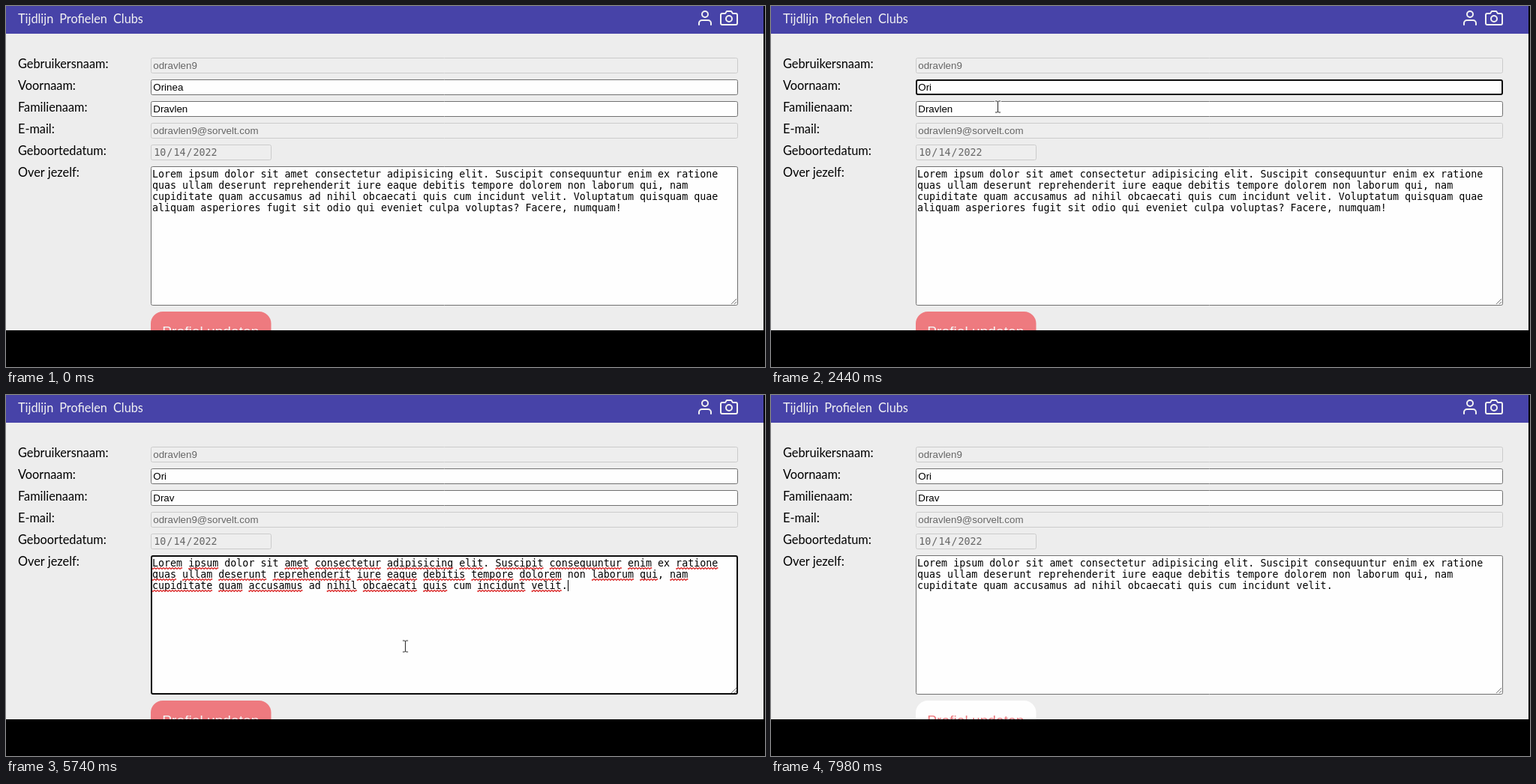
Write an HTML page with a canvas that moves like this. It is 1012 px wide and 482 px high and loops after 8 s.

```html
<!DOCTYPE html>
<html lang="nl">
<head>
<meta charset="utf-8">
<title>Profiel</title>
<style>
html, body { margin: 0; width: 100%; height: 100%; overflow: hidden; background: #000; }
canvas { display: block; }
</style>
</head>
<body>
<canvas id="stage" width="1012" height="482"></canvas>
<script>
const ctx = document.getElementById('stage').getContext('2d');
const LOOP = 8000, PAGE_W = 1010, PAGE_H = 433;
const LEFT = 193, WIDTH = 783, TEXT_X = 195, CHAR = 13.3333 * 0.60205, LINE = 15;
const LATO = '16.3px Lato, sans-serif';
const ARIAL = '13.3333px "Liberation Sans", Arial, sans-serif';
const MONO = '13.3333px "DejaVu Sans Mono", monospace';
const BUTTON_FONT = '19.2px "Liberation Sans", Arial, sans-serif';
const PAGE = '#ededed', PAPER = '#fefefe', INDIGO = '#4743a8', CORAL = '#ee7a7f';
const PALE = '#f2f2f2', MUTED = '#666', MINT = '#a2e9e6';

const BIO = [
  'Lorem ipsum dolor sit amet consectetur adipisicing elit. Suscipit consequuntur enim ex ratione',
  'quas ullam deserunt reprehenderit iure eaque debitis tempore dolorem non laborum qui, nam',
  'cupiditate quam accusamus ad nihil obcaecati quis cum incidunt velit. Voluptatum quisquam quae',
  'aliquam asperiores fugit sit odio qui eveniet culpa voluptas? Facere, numquam!'
];
const KEPT = BIO[2].indexOf(' Voluptatum');
const KNOWN = ['dolor', 'sit', 'ex', 'non', 'ad', 'cum'];
const LABELS = ['Gebruikersnaam:', 'Voornaam:', 'Familienaam:', 'E-mail:', 'Geboortedatum:', 'Over jezelf:'];

const FIRST = { text: 'Orinea', focus: 1450, erase: [1620, 1770, 1920] };
const LAST = { text: 'Dravlen', focus: 2640, erase: [2840, 2970, 3100] };
const BIO_FOCUS = 3500, SPELLING = 4100, DRAG = 4540, CUT = 5430, SUBMIT = 6920;

// Pointer path: time, x, y
const PATH = [
  [70, 400, -20], [900, 330, 116], [990, 327, 121], [1400, 310, 109], [2000, 310, 109],
  [2400, 302, 134], [3100, 302, 134], [3480, 927, 301], [4050, 927, 301], [4500, 820, 270],
  [4560, 820, 270], [4810, 748, 249], [5460, 748, 249], [6060, 270, 440]
];

const iconUser = new Path2D('M20 21v-2a4 4 0 0 0-4-4H8a4 4 0 0 0-4 4v2M16 7a4 4 0 1 1-8 0a4 4 0 1 1 8 0');
const iconCamera = new Path2D('M23 19a2 2 0 0 1-2 2H3a2 2 0 0 1-2-2V8a2 2 0 0 1 2-2h4l2-3h6l2 3h4a2 2 0 0 1 2 2zM16 13a4 4 0 1 1-8 0a4 4 0 1 1 8 0');
const arrow = new Path2D('M0 0V14L3.3 11L5.6 16.4L8 15.3L5.7 10.2H10Z');
const beam = new Path2D('M-3 -7.5H-1L0 -6.5L1 -7.5H3M0 -6.5V6.5M-3 7.5H-1L0 6.5L1 7.5H3');

function rect(x, y, w, h, color) {
  ctx.fillStyle = color;
  ctx.fillRect(x, y, w, h);
}

function text(str, x, y, font, color) {
  ctx.font = font;
  ctx.fillStyle = color;
  ctx.fillText(str, x, y);
}

function strokePath(path, x, y, color, width) {
  ctx.save();
  ctx.translate(x, y);
  ctx.lineCap = ctx.lineJoin = 'round';
  ctx.strokeStyle = color;
  ctx.lineWidth = width;
  ctx.stroke(path);
  ctx.restore();
}

function box(y, w, h, fill, border, line) {
  ctx.beginPath();
  ctx.roundRect(LEFT + line / 2, y + line / 2, w - line, h - line, 2);
  ctx.fillStyle = fill;
  ctx.fill();
  ctx.strokeStyle = border;
  ctx.lineWidth = line;
  ctx.stroke();
}

function field(y, h, focused) {
  box(y, WIDTH, h, PAPER, focused ? '#0c0c0c' : '#707070', focused ? 2 : 1);
}

function disabledField(y, w) {
  box(y, w, 21, '#eeeeee', '#cbcbcb', 1);
}

function caret(x, y, t, since) {
  if ((t - since) % 1000 < 500) rect(Math.round(x), y, 1, 15, '#000');
}

function pointerAt(t) {
  if (t < PATH[0][0]) return null;
  for (let i = 1; i < PATH.length; i++) {
    const [t0, x0, y0] = PATH[i - 1], [t1, x1, y1] = PATH[i];
    if (t < t1) {
      const u = (t - t0) / (t1 - t0), k = u * u * (3 - 2 * u);
      return { x: x0 + (x1 - x0) * k, y: y0 + (y1 - y0) * k };
    }
  }
  const [, x, y] = PATH[PATH.length - 1];
  return { x, y };
}

function drawNav() {
  rect(0, 0, PAGE_W, 37, INDIGO);
  let x = 16;
  for (const item of ['Tijdlijn', 'Profielen', 'Clubs']) {
    text(item, x, 23, LATO, PALE);
    x += ctx.measureText(item).width + 8;
  }
  strokePath(iconUser, 920, 4, PALE, 2);
  strokePath(iconCamera, 952, 4, PALE, 2);
}

function drawName(data, y, t, blur) {
  const focused = t >= data.focus && t < blur;
  const erased = data.erase.filter(e => t >= e);
  const value = data.text.slice(0, data.text.length - erased.length);
  field(y, 21, focused);
  text(value, 196.3, y + 15, ARIAL, '#000');
  if (focused) {
    caret(196.3 + ctx.measureText(value).width, y + 3, t, erased.pop() || data.focus);
  }
}

function drawDate(y) {
  disabledField(y, 161);
  let x = 196.3;
  for (const part of ['10', '/', '14', '/', '2022']) {
    const pad = part === '/' ? 0 : 1;
    text(part, x + pad, y + 15, MONO, MUTED);
    x += part.length * CHAR + 2 * pad;
  }
}

function squiggle(x, y, w) {
  ctx.beginPath();
  for (let i = 0; i <= w; i++) ctx.lineTo(x + i, y + Math.sin(i * Math.PI / 2) * 0.9);
  ctx.strokeStyle = '#dc3030';
  ctx.lineWidth = 1.4;
  ctx.stroke();
}

function drawSelection(p) {
  const row = p.y > 262 ? 3 : 2;
  const col = Math.min(BIO[row].length, Math.round((p.x - TEXT_X) / CHAR));
  for (let r = row; r < 4; r++) {
    const from = r === row ? col : 0, to = BIO[r].length + (r < 3 ? 2 : 0);
    rect(TEXT_X + from * CHAR, 217 + r * LINE, (to - from) * CHAR, LINE, MINT);
  }
}

function drawBio(t, p) {
  const focused = t >= BIO_FOCUS && t < SUBMIT;
  const lines = t < CUT ? BIO : [BIO[0], BIO[1], BIO[2].slice(0, KEPT)];
  field(214, 186, focused);
  if (t >= DRAG && t < CUT) drawSelection(p);
  lines.forEach((line, row) => {
    const y = 229 + row * LINE;
    text(line, TEXT_X, y, MONO, '#000');
    if (!focused || t < SPELLING) return;
    for (const m of line.matchAll(/\w+/g)) {
      if (!KNOWN.includes(m[0])) squiggle(TEXT_X + m.index * CHAR, y + 2.5, m[0].length * CHAR);
    }
  });
  if (focused && (t < DRAG || t >= CUT)) {
    const row = lines.length - 1;
    caret(TEXT_X + lines[row].length * CHAR, 217 + row * LINE, t, t < CUT ? BIO_FOCUS : CUT);
  }
  ctx.beginPath();
  for (const d of [7, 3]) {
    ctx.moveTo(974 - d, 398);
    ctx.lineTo(974, 398 - d);
  }
  ctx.strokeStyle = '#777';
  ctx.lineWidth = 1;
  ctx.stroke();
}

function drawButton(hover) {
  ctx.beginPath();
  ctx.roundRect(LEFT, 408, 160.5, 54, 16);
  ctx.fillStyle = hover ? PAPER : CORAL;
  ctx.fill();
  text('Profiel updaten', 208.3, 441, BUTTON_FONT, hover ? CORAL : PALE);
}

function drawPointer(p) {
  const inRow = (a, b) => p.y >= a && p.y < b;
  const editable = p.x >= LEFT && p.x < LEFT + WIDTH && (inRow(98, 119) || inRow(127, 148) || inRow(214, 400));
  if (editable) {
    const x = Math.round(p.x) + 0.5, y = Math.round(p.y) + 0.5;
    strokePath(beam, x, y, PALE, 3);
    strokePath(beam, x, y, '#333', 1);
    return;
  }
  strokePath(arrow, p.x, p.y, '#e4e4e4', 1.5);
  ctx.save();
  ctx.translate(p.x, p.y);
  ctx.fillStyle = '#2c2c2c';
  ctx.fill(arrow);
  ctx.restore();
}

function draw(t) {
  const p = pointerAt(t);
  const hover = p && p.y > 408 && p.x > LEFT && p.x < 354;
  rect(0, 0, 1012, 482, '#000');
  ctx.save();
  ctx.beginPath();
  ctx.rect(0, 0, PAGE_W, PAGE_H);
  ctx.clip();
  rect(0, 0, PAGE_W, PAGE_H, PAGE);
  drawNav();
  LABELS.forEach((s, i) => text(s, 16, 83 + 29 * i, LATO, '#000'));
  disabledField(69, WIDTH);
  text('odravlen9', 196.3, 84, ARIAL, MUTED);
  drawName(FIRST, 98, t, LAST.focus);
  drawName(LAST, 127, t, BIO_FOCUS);
  disabledField(156, WIDTH);
  text('odravlen9@sorvelt.com', 196.3, 171, ARIAL, MUTED);
  drawDate(185);
  drawBio(t, p);
  drawButton(hover);
  if (p) drawPointer(p);
  ctx.restore();
}

const start = performance.now();
function tick() {
  draw((performance.now() - start) % LOOP);
  requestAnimationFrame(tick);
}
tick();
</script>
</body>
</html>
```
